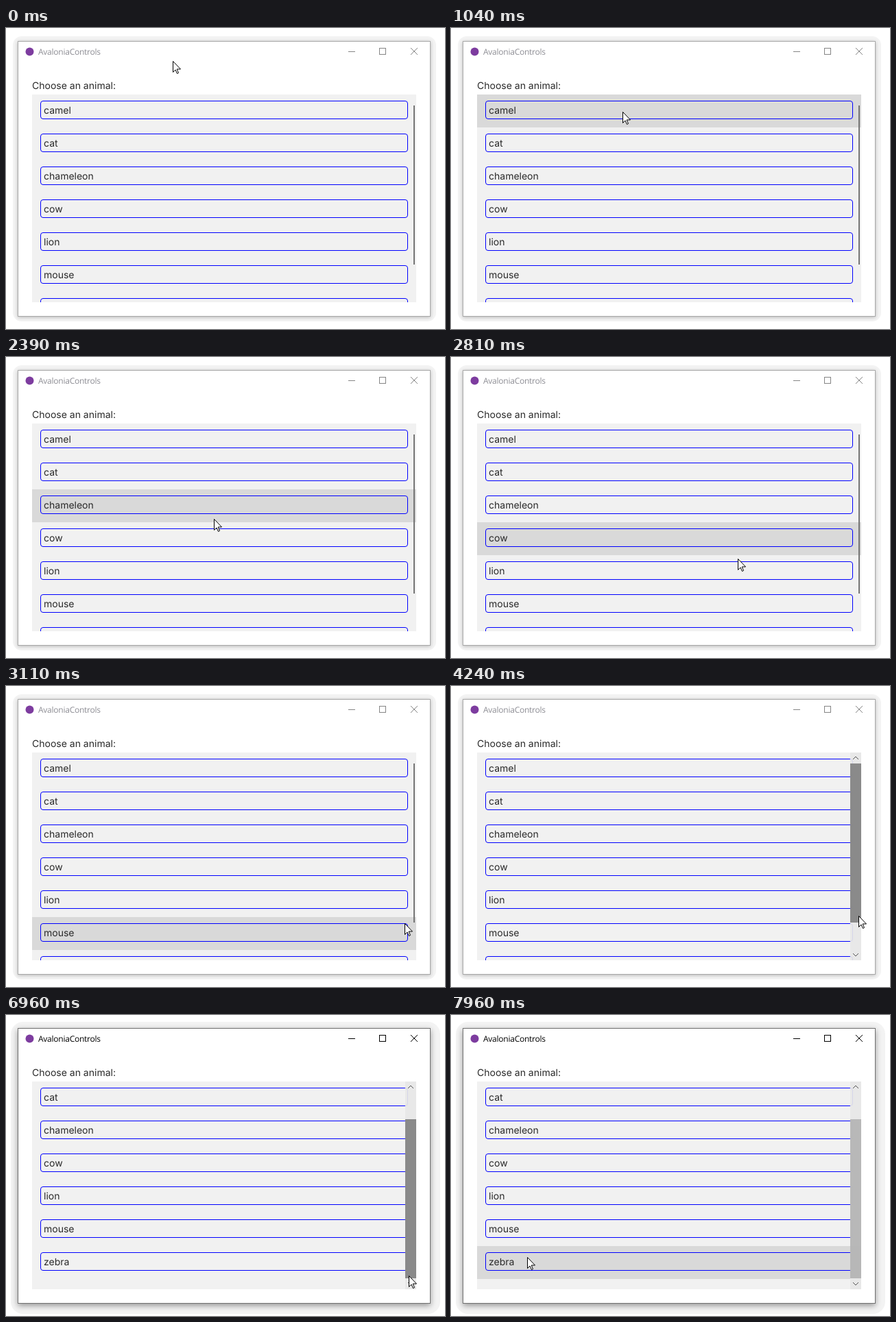
Animation of 640x439 px, one loop 8 s. Source, as an HTML page:

```html
<!DOCTYPE html>
<html lang="en">
<head>
<meta charset="utf-8">
<title>Animal list</title>
<style>
  html, body { margin: 0; width: 100%; height: 100%; overflow: hidden; background: #fff; }
  svg { display: block; }
  text { font: 14px Inter, sans-serif; fill: #2a2a2a; text-rendering: geometricPrecision; }
  #title { font: 12px "Open Sans", "Noto Sans", sans-serif; letter-spacing: -.25px; fill: #8d8d94; }
  #frame { fill: #fff; stroke: #a8a8a8; }
  #buttons { fill: none; stroke: #858585; }
  .active #title { fill: #000; }
  .active #frame { stroke: #707070; }
  .active #buttons { stroke: #000; }
  .shadow rect { fill: #f3f3f3; }
  .shadow .blur { fill: #000; }
  .active .idle, .shadow.focus { display: none; }
  .active .shadow.focus { display: inline; }
  #rows rect { fill: none; stroke: #00f; }
</style>
</head>
<body>
<svg id="stage" width="640" height="439" viewBox="0 0 640 439">
  <defs>
    <filter id="soft" x="-10%" y="-10%" width="120%" height="120%"><feGaussianBlur stdDeviation="2.5"/></filter>
    <filter id="deep" x="-10%" y="-10%" width="120%" height="120%"><feGaussianBlur stdDeviation="4.5"/></filter>
    <clipPath id="list"><rect x="38" y="97" width="560" height="303"/></clipPath>
  </defs>
  <g class="shadow idle">
    <rect x="10" y="12" width="617" height="416" rx="13"/>
    <rect class="blur" x="17" y="20" width="602" height="402" opacity=".25" filter="url(#soft)"/>
  </g>
  <g class="shadow focus">
    <rect x="7" y="10" width="626" height="426" rx="18"/>
    <rect class="blur" x="17" y="22" width="602" height="402" opacity=".38" filter="url(#deep)"/>
  </g>
  <rect id="frame" x="17.5" y="19.5" width="601" height="401"/>
  <circle cx="34.5" cy="34.5" r="6" fill="#7d3c9f"/>
  <text id="title" x="47" y="39">AvaloniaControls</text>
  <g id="buttons">
    <path d="M499 34.5h10M590 29l10 10m0-10l-10 10"/>
    <rect x="544.5" y="29.5" width="9" height="9"/>
  </g>
  <text x="38" y="89">Choose an animal:</text>
  <g clip-path="url(#list)">
    <rect x="38" y="97" width="560" height="303" fill="#f1f1f1"/>
    <rect id="hover" x="38" width="560" height="48" opacity=".1"/>
    <g id="rows"></g>
    <g id="track">
      <rect x="582" y="97" width="16" height="303" fill="#e8e8e8" opacity=".92"/>
      <path d="M586 107l4-4 4 4M586 390l4 4 4-4" fill="none" stroke="#555"/>
    </g>
    <rect id="thumb" height="232" opacity=".9"/>
  </g>
  <path id="cursor" d="M.5.5v16l3.5-3.5 2.5 5.5 2-1-2.3-5.5h5.3z" fill="#fff" stroke="#000"/>
</svg>
<script>
const LOOP = 8000, PRESS = 4660, RELEASE = 6960, EXPAND = 3500;
const ROW = 48, TOP = 97, BAR = 582, GRAB = 336, TRAVEL = 39;
const animals = ['camel', 'cat', 'chameleon', 'cow', 'lion', 'mouse', 'zebra'];

const clamp = (v, lo, hi) => Math.min(hi, Math.max(lo, v));
const easeOut = u => u * (2 - u);
const steady = u => u;

// Pointer moves; it rests between them
const moves = [
  { from: 500, to: 1040, x: 250, y: 122 },
  { from: 1220, to: 1560, x: 256, y: 170 },
  { from: 1750, to: 2090, x: 270, y: 219 },
  { from: 2270, to: 2810, x: 417, y: 294, ease: steady },
  { from: 2810, to: 3220, x: 594, y: 350 },
  { from: 3470, to: 3740, x: 594, y: 335 },
  { from: 4240, to: 4470, x: 589, y: GRAB },
  { from: PRESS, to: 5890, x: 587, y: 380, ease: steady },
  { from: 7210, to: 7960, x: 111, y: 353 }
];

function pointer(t) {
  let x = 243, y = 48;
  for (const { from, to, ease = easeOut, ...end } of moves) {
    const k = ease(clamp((t - from) / (to - from), 0, 1));
    x += (end.x - x) * k;
    y += (end.y - y) * k;
  }
  return { x, y };
}

const el = id => document.getElementById(id);
const set = (node, attrs) => { for (const k in attrs) node.setAttribute(k, attrs[k]); };
const shown = on => on ? 'visible' : 'hidden';

el('rows').innerHTML = animals.map((_, i) => {
  const y = TOP + i * ROW;
  return `<g><rect x="50.5" y="${y + 9.5}" width="535" height="26" rx="3.5"/><text x="55" y="${y + 28}"></text></g>`;
}).join('');
const rows = [...el('rows').children];

function thumbColor(t, x, open) {
  if (!open) return '#696969';
  if (t >= PRESS && t < RELEASE) return '#4d4d4d';
  return x >= BAR ? '#808080' : '#b3b3b3';
}

function draw(t) {
  const tip = pointer(t);
  const late = pointer(t - 80); // hover state trails the pointer
  const drag = t < PRESS ? 0 : clamp(pointer(Math.min(t, RELEASE)).y - GRAB, 0, TRAVEL);
  const first = Math.floor(drag / TRAVEL);
  const open = clamp((t - EXPAND) / 120, 0, 1);

  el('stage').classList.toggle('active', t >= PRESS);
  set(el('cursor'), { transform: `translate(${Math.round(tip.x)} ${Math.round(tip.y)})` });
  set(el('hover'), {
    y: TOP + Math.floor((late.y - TOP) / ROW) * ROW,
    visibility: shown(late.y >= TOP && late.x < BAR)
  });
  rows.forEach((row, i) => {
    const name = animals[first + i];
    row.lastChild.textContent = name || '';
    set(row, { visibility: shown(name) });
  });
  set(el('track'), { opacity: open });
  set(el('thumb'), {
    x: 594 - 12 * open,
    width: 2 + 14 * open,
    y: TOP + 16 + Math.round(drag),
    fill: thumbColor(t, late.x, open)
  });
}

const start = performance.now();
(function tick() {
  draw((performance.now() - start) % LOOP);
  requestAnimationFrame(tick);
})();
</script>
</body>
</html>
```
